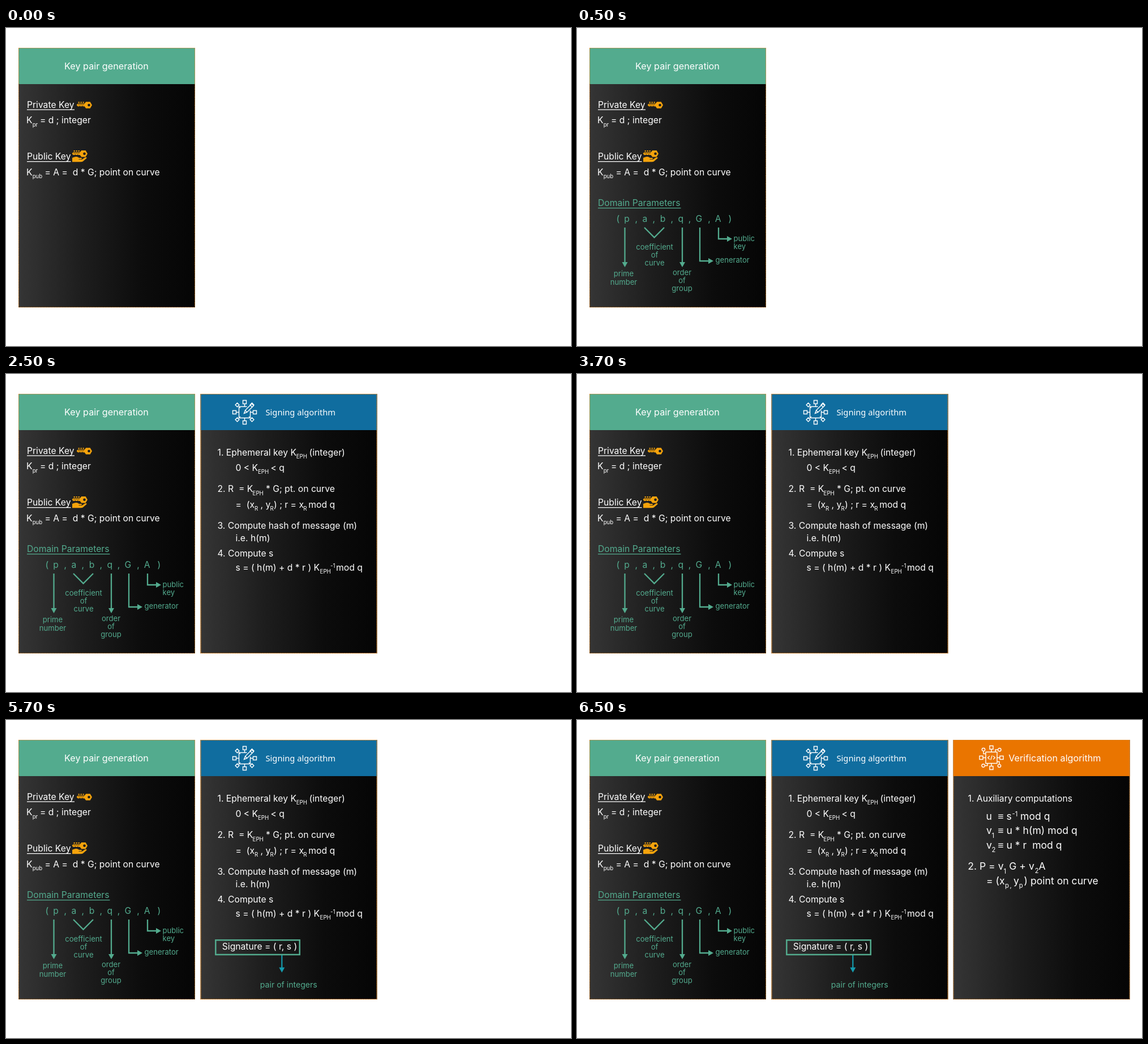
Write an HTML page that moves like this. It is 998 px wide and 561 px high and loops after 8000 ms.

```html
<!DOCTYPE html>
<html lang="en">
<head>
<meta charset="utf-8">
<title>Digital signature steps</title>
<style>
  html, body { margin: 0; width: 100%; height: 100%; overflow: hidden; background: #fff; }
  svg { display: block; width: 998px; height: 561px; }
  text { font-family: Inter, sans-serif; white-space: pre; }
</style>
</head>
<body>
<svg id="stage" viewBox="0 0 998 561" xmlns="http://www.w3.org/2000/svg">
  <defs>
    <linearGradient id="shade">
      <stop offset="0" stop-color="#353535"/>
      <stop offset=".35" stop-color="#1e1e1e"/>
      <stop offset=".7" stop-color="#0c0c0c"/>
      <stop offset="1" stop-color="#050505"/>
    </linearGradient>
    <g id="key" fill="#f5a30c">
      <path fill-rule="evenodd" d="M0 5 L2 3.6 H13.6 L16.2 .3 H23.6 L27 6 L23.6 11.7 H16.2 L13.6 8.2 H11 L9.8 7.2 L8.4 8.2 H6.6 L5.4 7.2 L4 8.2 H2 L0 6.6 Z M19.2 6 a2.3 2.3 0 1 0 4.6 0 a2.3 2.3 0 1 0 -4.6 0 Z"/>
      <path d="M2 5.3 H13" stroke="#33260c" stroke-width=".7"/>
      <path d="M2.6 1.3 h2.2 M6.6 1.3 h2.2 M10.6 1.3 h2.2" stroke="#f5a30c" stroke-width="2"/>
    </g>
  </defs>
</svg>
<script>
const LOOP = 8000;
const GREEN = '#53ab8e', BLUE = '#106d9f', ORANGE = '#ea7500', TEAL = '#159bad', WHITE = '#fff';
const BODY = 15.7, HEAD = 16.2, SUB = 9.7, NOTE = 13.1, BIG = 17.6, BIG_SUB = 11.3;
const stage = document.getElementById('stage');
const layers = [];

function add(parent, tag, attrs, content) {
  const node = document.createElementNS('http://www.w3.org/2000/svg', tag);
  for (const name in attrs) node.setAttribute(name, attrs[name]);
  if (content) node.textContent = content;
  parent.appendChild(node);
  return node;
}

function layer(start) {
  const g = add(stage, 'g', {});
  layers.push({ g, start });
  return g;
}

function text(g, x, y, content, size = BODY, fill = WHITE, anchor = 'start') {
  return add(g, 'text', { x, y, 'font-size': size, fill, 'text-anchor': anchor }, content);
}

// Places [x, string, dy] parts on one baseline; a dy marks a small index.
function line(g, y, parts, size = BODY, small = SUB) {
  for (const [x, content, dy] of parts) text(g, x, y + (dy || 0), content, dy ? small : size);
}

function path(g, d, stroke, width, extra = {}) {
  return add(g, 'path', { d, fill: 'none', stroke, 'stroke-width': width, ...extra });
}

function panel(g, x, color, dash) {
  add(g, 'rect', { x, y: 35, width: 312, height: 458, fill: 'url(#shade)' });
  add(g, 'rect', { x, y: 35, width: 312, height: 64, fill: color });
  add(g, 'rect', {
    x: x + .5, y: 35.5, width: 311, height: 457, fill: 'none',
    stroke: '#d9882c', 'stroke-width': 1.1, 'stroke-dasharray': dash
  });
}

function underlined(g, x, y, content, width, color = WHITE) {
  text(g, x, y, content, BODY, color);
  path(g, `M${x} ${y + 3.6} h${width}`, color, 1.2);
}

function head(g, x, y, angle, color) {
  add(g, 'path', {
    d: 'M0 0 L-9 -5 V5 Z', fill: color, transform: `translate(${x} ${y}) rotate(${angle})`
  });
}

function note(g, x, y, rows, step, anchor = 'middle') {
  rows.forEach((row, i) => text(g, x, y + i * step, row, NOTE, GREEN, anchor));
}

// Chip with four square nodes on the axes and four more on the diagonals.
function chip(g, cx, cy, corner, core) {
  const icon = add(g, 'g', {
    transform: `translate(${cx} ${cy})`, fill: 'none', stroke: WHITE, 'stroke-width': 1.4
  });
  add(icon, 'path', { d: core });
  for (let i = 0; i < 4; i++) {
    const arm = add(icon, 'g', { transform: `rotate(${i * 90})` });
    add(arm, 'path', { d: 'M0 -10 V-15 M-3 -21 h6 v6 h-6 Z' });
    add(arm, 'path', { d: corner });
  }
  return icon;
}

function buildKeys() {
  const g = layer(0);
  panel(g, 22, GREEN, '1.6 1.2');
  text(g, 177.5, 73, 'Key pair generation', HEAD, WHITE, 'middle');
  underlined(g, 37, 140.5, 'Private Key', 84);
  add(g, 'use', { href: '#key', x: 125, y: 130 });
  line(g, 168, [[36, 'K'], [46.7, 'pr', 5.5], [60, '= d ; integer']]);
  underlined(g, 37, 232, 'Public Key', 77.5);
  add(g, 'use', { href: '#key', x: 117, y: 215.7 });
  add(g, 'path', {
    d: 'M117 229 L121 227.6 Q124 226.2 127 227.8 L129 229 H133 Q135 230.2 133 231.2 H128.5 V232 H134 L139.5 228.4 Q142.5 227.4 142.6 229.4 L136 235.2 Q134.6 236.2 132 236.2 H117 Z',
    fill: '#f5a30c'
  });
  line(g, 260, [[36, 'K'], [46.7, 'pub', 5.2], [68.5, '= A =  d * G; point on curve']]);
}

function buildDomain() {
  const g = layer(500);
  underlined(g, 37, 314, 'Domain Parameters', 146.5, GREEN);
  text(g, '69.5 83.3 102.4 115.6 133.6 146.8 165.6 178.6 196.8 209.6 231.2 243.8 267.5', 342,
    '(p,a,b,q,G,A)', BODY, GREEN);
  path(g, 'M84.5 352 V414 M119 352 L136.5 369.5 L154 352 M186 352 V414 M217 352 V411 H233 M250 352 V372 H266', GREEN, 2.3);
  head(g, 84.5, 422, 90, GREEN);
  head(g, 186, 422, 90, GREEN);
  head(g, 241, 411, 0, GREEN);
  head(g, 274, 372, 0, GREEN);
  note(g, 82.5, 437.5, ['prime', 'number'], 15);
  note(g, 137, 390.5, ['coefficient', 'of', 'curve'], 14.2);
  note(g, 185.5, 436, ['order', 'of', 'group'], 14.2);
  note(g, 276.5, 376, ['public', 'key'], 13.6, 'start');
  note(g, 244.5, 413.5, ['generator'], 0, 'start');
}

function buildSigning() {
  const g = layer(2500);
  panel(g, 343.5, BLUE, '2.4 .5');
  const icon = chip(g, 421.5, 67.5, 'M7.5 -7.5 L9.5 -9.5 M13 -16.4 L16.4 -13 L13 -9.6 L9.6 -13 Z',
    'M4 -10 H-10 V10 H10 V-3');
  add(icon, 'path', {
    d: 'M-1 2 L1 -3.4 L12.6 -15 L16 -11.8 L4.2 0 Z', fill: BLUE
  });
  add(icon, 'path', { d: 'M1 -3.4 L4.2 0 M10 -12.5 L13.4 -9' });
  text(g, 458.5, 73, 'Signing algorithm', 14.7).style.fontFamily = '"Noto Sans", sans-serif';
  line(g, 143.5, [[373.5, '1. Ephemeral key K'], [512.8, 'EPH', 5.2], [535.5, '(integer)']]);
  line(g, 171, [[405.5, '0 < K'], [445, 'EPH', 5.2], [467.5, '< q']]);
  line(g, 208, [[373.5, '2. R  = K'], [435.6, 'EPH', 5.5], [459, '* G; pt. on curve']]);
  line(g, 236, [[405.5, '=  (x'], [439, 'R', 5.2], [449.5, ', y'], [466.4, 'R', 5.2],
    [473, ') ; r = x'], [525.3, 'R', 5.2], [534.3, 'mod q']]);
  line(g, 272.5, [[373.5, '3. Compute hash of message (m)']]);
  line(g, 294.5, [[405.5, 'i.e. h(m)']]);
  line(g, 322, [[373.5, '4. Compute s']]);
  line(g, 346.5, [[405.5, 's = ( h(m) + d * r ) K'], [554.6, 'EPH', 5], [573, '-1', -5], [583, 'mod q']]);
}

function buildSignature() {
  const g = layer(4500);
  add(g, 'rect', { x: 370.3, y: 388.3, width: 148.4, height: 25.6, fill: 'none', stroke: GREEN, 'stroke-width': 2.5 });
  text(g, 381.8, 405, 'Signature = ( r, s )');
  path(g, 'M487.3 415 V438', TEAL, 2.2);
  head(g, 487.3, 445.5, 90, TEAL);
  text(g, 499.3, 471.5, 'pair of integers', 14.1, GREEN, 'middle');
}

function buildVerification() {
  const g = layer(6500);
  panel(g, 664.5, ORANGE, '1.6 1');
  const icon = chip(g, 732, 66.5, 'M7 -10 V-14 H11.6 M11.6 -14 a2.7 2.7 0 1 0 5.4 0 a2.7 2.7 0 1 0 -5.4 0',
    'M-10 -10 H10 V10 H-10 Z');
  add(icon, 'path', { d: 'M-3.2 -3 L-6.4 0 L-3.2 3 M3.2 -3 L6.4 0 L3.2 3 M1.3 -4 L-1.3 4', 'stroke-width': 1.2 });
  text(g, 762.2, 72.5, 'Verification algorithm', HEAD);
  line(g, 143.5, [[690.5, '1. Auxiliary computations']]);
  const big = (y, parts) => line(g, y, parts, BIG, BIG_SUB);
  big(176, [[722.5, 'u'], [743.3, '≡ s'], [768.5, '-1', -6], [783, 'mod q']]);
  big(201, [[723, 'v'], [732.5, '1', 6.5], [743.3, '≡ u * h(m) mod q']]);
  big(227, [[723, 'v'], [732.5, '2', 6], [743.3, '≡ u * r  mod q']]);
  big(264, [[690.2, '2. P = v'], [753.6, '1', 6.5], [763.3, 'G + v'], [808.8, '2', 6], [815.6, 'A']]);
  big(290, [[723, '= (x'], [756, 'p', 5.5], [764.5, ',', 5.5], [771, 'y'], [780.8, 'p', 5.5],
    [789.5, ')'], [801, 'point on curve']]);
}

function draw(time) {
  const t = time % LOOP;
  for (const { g, start } of layers) g.style.display = t >= start ? '' : 'none';
}

buildKeys();
buildDomain();
buildSigning();
buildSignature();
buildVerification();

const began = performance.now();
function tick() {
  draw(performance.now() - began);
  requestAnimationFrame(tick);
}
tick();
</script>
</body>
</html>
```
